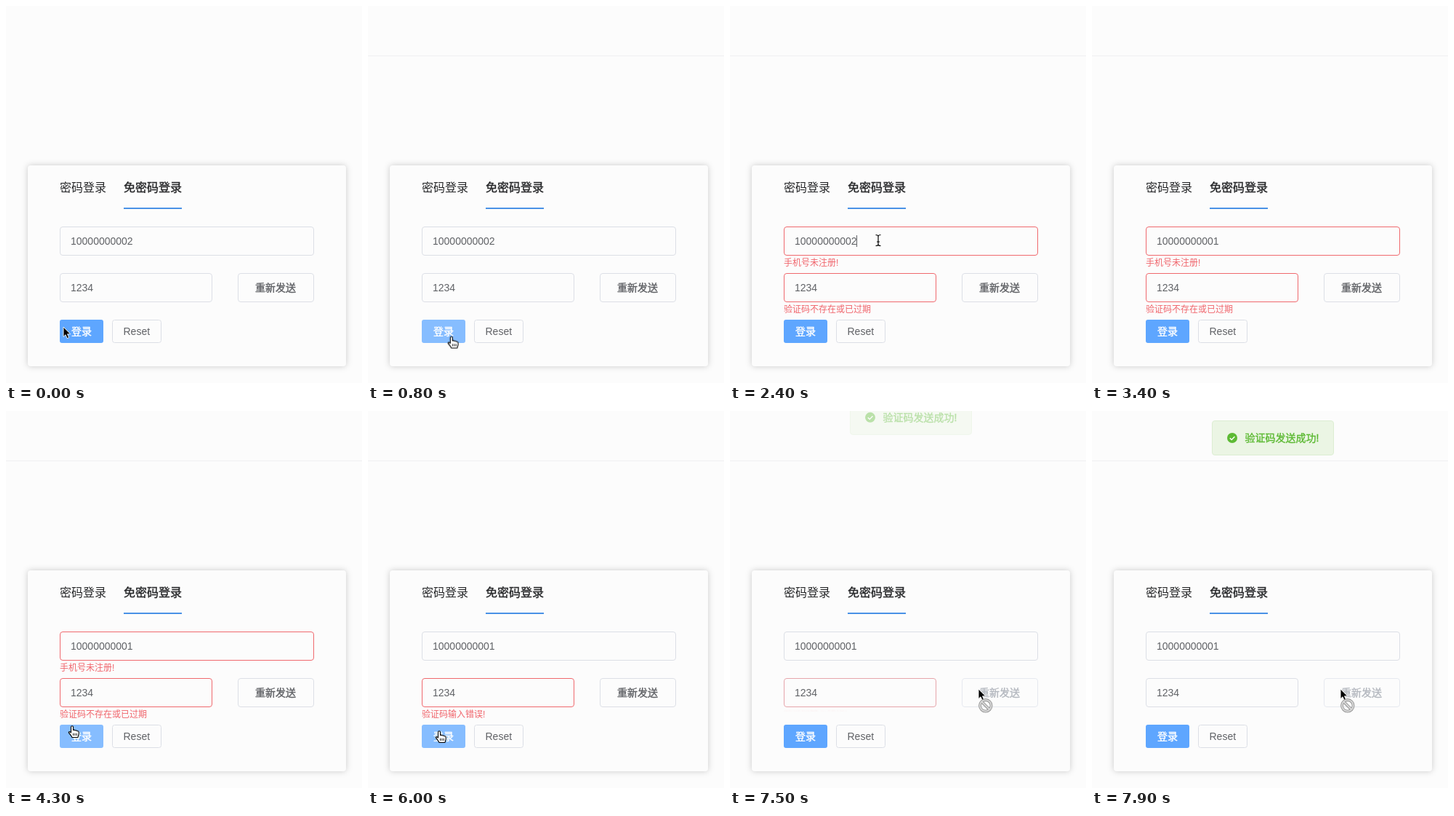
Animation of 490x518 px, one loop 8000 ms. Source, as an HTML page:

```html
<!DOCTYPE html>
<html lang="zh-CN">
<head>
<meta charset="utf-8">
<title>登录</title>
<style>
html, body { margin: 0; width: 100%; height: 100%; overflow: hidden; background: #fcfcfc; }
svg { display: block; width: 490px; height: 518px; }
text { font: 14px "Liberation Sans", "Noto Sans CJK SC", "Noto Sans CJK", sans-serif; fill: currentColor; }
.card { fill: #fcfcfc; filter: drop-shadow(0 0 4px rgba(0, 0, 0, .2)); }
.tab { font-size: 16px; color: #262729; }
.medium { stroke: currentColor; stroke-width: .4px; }
.box { fill: #fcfcfc; stroke: #dcdfe6; }
.gray { color: #606266; }

/* every animation shares the 8 s loop; 1% is 80 ms */
.rule, .number, .caret, .cursor > * { animation: 8s step-end infinite; }
.phone, .code, .error, .login, .resend, .toast, .cursor { animation: 8s linear infinite; }

.rule { animation-name: rule; }
@keyframes rule { 0% { opacity: 0 } 3.75%, 100% { opacity: 1 } }

.old { animation-name: old; }
.cut { animation-name: cut; }
.new { animation-name: new; }
@keyframes old { 0% { opacity: 1 } 33.75%, 100% { opacity: 0 } }
@keyframes cut { 0% { opacity: 0 } 33.75% { opacity: 1 } 37.5%, 100% { opacity: 0 } }
@keyframes new { 0% { opacity: 0 } 37.5%, 100% { opacity: 1 } }

.caret { animation-name: caret; }
@keyframes caret {
  0% { opacity: 0; transform: none }
  28.75% { opacity: 1; transform: none }
  33.75% { opacity: 1; transform: translateX(-7.8px) }
  37.5% { opacity: 1; transform: none }
  40% { opacity: 0 }
  46.25% { opacity: 1 }
  52.5%, 100% { opacity: 0 }
}

.phone { animation-name: phone; }
.code { animation-name: code; }
@keyframes phone {
  0%, 12.5% { stroke: #dcdfe6 }
  15%, 57.5% { stroke: #f0696e }
  60%, 100% { stroke: #dcdfe6 }
}
@keyframes code {
  0%, 12.5% { stroke: #dcdfe6 }
  15%, 57.5% { stroke: #f0696e }
  60%, 61.25% { stroke: #dcdfe6 }
  63.75%, 92.5% { stroke: #f0696e }
  95%, 100% { stroke: #dcdfe6 }
}

.error { font-size: 12px; color: #f0646b; animation-name: first; animation-timing-function: cubic-bezier(.23, 1, .32, 1); }
.error.second { animation-name: second; }
.e1 { transform-origin: 74px 347px; }
.e2 { transform-origin: 74px 411px; }
@keyframes first {
  0%, 12.5% { opacity: 0; transform: scaleY(0) }
  16.25%, 57.5% { opacity: 1; transform: none }
  61.25%, 100% { opacity: 0; transform: scaleY(0) }
}
@keyframes second {
  0%, 61.25% { opacity: 0; transform: scaleY(0) }
  65%, 92.5% { opacity: 1; transform: none }
  96.25%, 100% { opacity: 0; transform: scaleY(0) }
}

.login { animation-name: login; }
@keyframes login {
  0%, 1.25% { fill: #5ea6ff }
  2.5%, 20% { fill: #86bdff }
  21.5%, 52.5% { fill: #5ea6ff }
  53.5%, 87.5% { fill: #86bdff }
  89%, 100% { fill: #5ea6ff }
}

.resend { animation-name: resend; }
@keyframes resend {
  0%, 86.5% { color: #606266; fill: #fcfcfc; stroke: #dcdfe6 }
  87.4%, 92% { color: #4a90dc; fill: #ecf5fe; stroke: #c8dff5 }
  93.25%, 100% { color: #b4b8bf; fill: #fcfcfc; stroke: #e6e9ef }
}
.resend rect { fill: inherit; stroke: inherit; }

.toast { color: #5dba34; animation-name: toast; animation-timing-function: ease; }
@keyframes toast {
  0%, 92.5% { opacity: 0; transform: translateY(-48px) }
  97.5%, 100% { opacity: 1; transform: none }
}

.cursor { animation-name: move; animation-timing-function: ease-in-out; }
@keyframes move {
  0%, 1.25% { transform: translate(79px, 441px) }
  3.75%, 6.25% { transform: translate(108px, 458px) }
  16.25%, 17.5% { transform: translate(131px, 446px) }
  27.5%, 45% { transform: translate(204px, 322px) }
  53.75%, 56.25% { transform: translate(91px, 433px) }
  66.25%, 67.5% { transform: translate(93px, 437px) }
  75%, 82.5% { transform: translate(98px, 440px) }
  87.5% { transform: translate(320px, 396px) }
  92.5%, 100% { transform: translate(342px, 382px) }
}
.cursor .arrow { animation-name: arrow; }
.cursor .hand { animation-name: hand; }
.cursor .beam { animation-name: beam; }
.cursor .ban { animation-name: ban; }
@keyframes arrow {
  0% { opacity: 1 } 1.25% { opacity: 0 }
  85% { opacity: 1 } 87.25% { opacity: 0 }
  92.5%, 100% { opacity: 1 }
}
@keyframes hand {
  0% { opacity: 0 } 1.25% { opacity: 1 } 20% { opacity: 0 }
  52.5% { opacity: 1 } 85% { opacity: 0 }
  87.25% { opacity: 1 } 92.5%, 100% { opacity: 0 }
}
@keyframes beam {
  0% { opacity: 0 } 20% { opacity: 1 } 33.75% { opacity: 0 }
  45% { opacity: 1 } 52.5%, 100% { opacity: 0 }
}
@keyframes ban { 0% { opacity: 0 } 92.5%, 100% { opacity: 1 } }
</style>
</head>
<body>
<svg viewBox="0 0 490 518">
  <rect class="rule" y="68" width="490" height="1" fill="#f0f0f1"/>
  <rect class="card" x="30" y="219" width="438" height="276" rx="4"/>

  <text class="tab" x="74" y="255">密码登录</text>
  <text class="tab medium" x="162" y="255">免密码登录</text>
  <rect x="162" y="277" width="80" height="2" fill="#4a92e6"/>

  <rect class="box phone" x="74.5" y="303.5" width="349" height="39" rx="3.5"/>
  <g class="gray">
    <text class="number old" x="89" y="328">10000000002</text>
    <text class="number cut" x="89" y="328">1000000000</text>
    <text class="number new" x="89" y="328">10000000001</text>
  </g>
  <rect class="caret" x="174" y="315" width="1" height="16" fill="#606266"/>
  <text class="error e1" x="74" y="357">手机号未注册!</text>

  <rect class="box code" x="74.5" y="367.5" width="209" height="39" rx="3.5"/>
  <text class="gray" x="89" y="392">1234</text>
  <text class="error e2" x="74" y="421">验证码不存在或已过期</text>
  <text class="error second e2" x="74" y="421">验证码输入错误!</text>

  <g class="resend">
    <rect x="319.5" y="367.5" width="104" height="39" rx="3.5"/>
    <text class="medium" x="343" y="392">重新发送</text>
  </g>

  <rect class="login" x="74" y="431" width="60" height="32" rx="3"/>
  <text class="medium" x="90" y="452" color="#fff">登录</text>
  <rect class="box" x="146.5" y="431.5" width="67" height="31" rx="3"/>
  <text class="gray" x="161.5" y="452">Reset</text>

  <g class="toast">
    <rect x="165.5" y="13.5" width="167" height="47" rx="3.5" fill="#ebf5e4" stroke="#dcedd2"/>
    <circle cx="193" cy="37" r="7" fill="currentColor"/>
    <path d="M189.8 37.2l2.4 2.3 4.2-4.3" fill="none" stroke="#fff" stroke-width="1.4"/>
    <text class="medium" x="210.5" y="42">验证码发送成功!</text>
  </g>

  <g class="cursor">
    <path class="arrow" d="M0 0V13.5L3 10.7 5.2 15.6 7.6 14.6 5.5 9.8H9.7Z" fill="#000" stroke="#fff" stroke-width=".9"/>
    <g class="ban" fill="none">
      <g id="sign"><circle cx="9.8" cy="22.8" r="7.8"/><path d="M4.3 17.3l11 11"/></g>
      <use href="#sign" stroke="#8e8e8e" stroke-width="3.8"/>
      <use href="#sign" stroke="#d6d6d6" stroke-width="2.2"/>
    </g>
    <g class="hand" fill="#fff" stroke="#000" stroke-width="1.1" stroke-linejoin="round">
      <path d="M-1.5 9V1.2A1.5 1.5 0 0 1 1.5 1.2V5.5Q3 4.6 4.2 6 5.8 5.2 6.8 6.8 9 6.2 9.2 8.5V11Q8.5 13 8 15.5H0Q-1 13-4.3 9.5-5.2 8-3.8 7.6-2.6 7.6-1.5 9Z"/>
      <path d="M1.6 9.8V13M3.9 9.8V13M6.2 9.8V13" stroke-width=".9"/>
    </g>
    <g class="beam" fill="none">
      <path id="bar" d="M-3.5-7.5Q0-7.5 0-5.5 0-7.5 3.5-7.5M0-6V6M-3.5 7.5Q0 7.5 0 5.5 0 7.5 3.5 7.5M-2 2H2"/>
      <use href="#bar" stroke="#fff" stroke-width="2.6"/>
      <use href="#bar" stroke="#000" stroke-width="1.2"/>
    </g>
  </g>
</svg>
</body>
</html>
```
